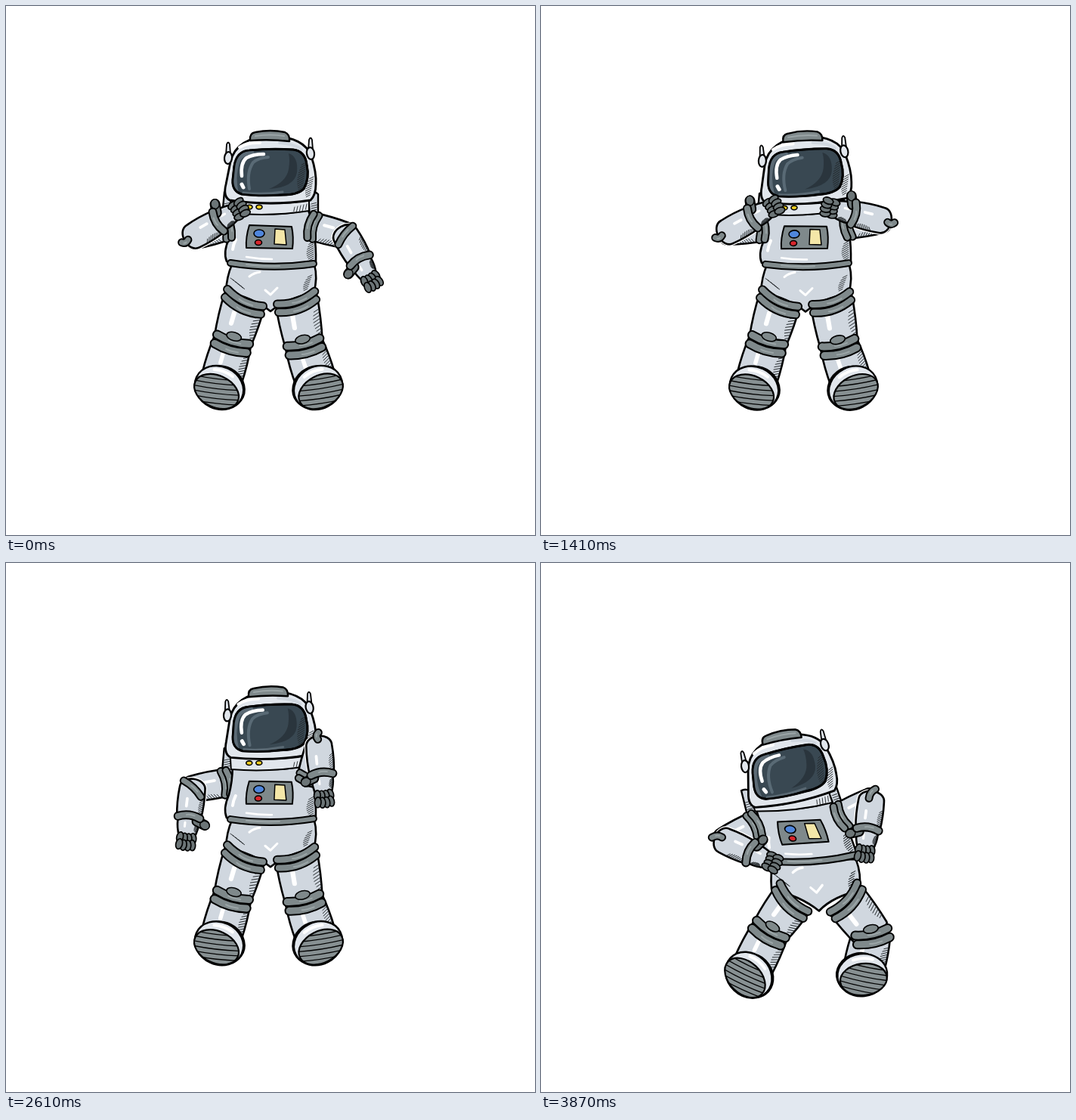
These frames come from a looping animation (700 by 700 pixels, 3.9 s). An HTML page with a canvas:

```html
<!DOCTYPE html>
<html lang="en">
<head>
<meta charset="utf-8">
<title>Dancing astronaut</title>
<style>
html, body { margin: 0; width: 100%; height: 100%; overflow: hidden; background: #fff; }
canvas { display: block; width: 700px; height: 700px; }
</style>
</head>
<body>
<canvas id="stage" width="700" height="700"></canvas>
<script>
const ctx = document.getElementById('stage').getContext('2d');
const LOOP = 3900, STEP = 30, BOB = 3060, FALL = 54, UPPER = 48, FORE = 72;
const SUIT = '#d0d7df', PALE = '#e1e6ec', GREY = '#7f898b', SHINE = '#9ba5a7', GLOVE = '#6c7577', INK = '#000';

// Key poses: head sway and tilt, and where the hands are. The rest of the body follows.
const poses = [
  { t: 0, sway: 0, tilt: 0, fall: 0, left: [310, 268], right: [485, 366] },
  { t: 570, sway: -12, tilt: -4, left: [327, 291], right: [368, 307] },
  { t: 810, left: [188, 286] },
  { t: 1050, sway: 12, tilt: 2, left: [293, 242], right: [385, 291] },
  { t: 1770, sway: -12, tilt: -9, left: [322, 299], right: [376, 249] },
  { t: 2190, sway: -1, tilt: -1, left: [350, 327], right: [384, 266] },
  { t: 2560, left: [236, 372] },
  { t: 3060, sway: 0, tilt: -5, fall: 0, left: [308, 366], right: [455, 356] },
  { t: 3240, fall: 18 },
  { t: 3870, sway: -21, tilt: -12, fall: FALL, left: [308, 341], right: [428, 330] }
];

// Monotone cubic interpolation through the poses that set the given part.
function sample(part, t, axis) {
  const keys = poses.filter(p => part in p);
  const value = k => axis === undefined ? keys[k][part] : keys[k][part][axis];
  const i = keys.findIndex(p => p.t > t) - 1;
  if (i < 0) return value(keys.length - 1);
  const slope = k => keys[k] && keys[k + 1] ? (value(k + 1) - value(k)) / (keys[k + 1].t - keys[k].t) : 0;
  const tangent = k => {
    const a = slope(k - 1), b = slope(k);
    return a * b > 0 ? 2 * a * b / (a + b) : 0;
  };
  const span = keys[i + 1].t - keys[i].t, u = (t - keys[i].t) / span, v = 1 - u;
  return v * v * (1 + 2 * u) * value(i) + u * u * (3 - 2 * u) * value(i + 1)
    + span * u * v * (v * tangent(i) - u * tangent(i + 1));
}

const clamp = (x, low, high) => Math.min(high, Math.max(low, x));
const mix = (a, b, k) => [a[0] + (b[0] - a[0]) * k, a[1] + (b[1] - a[1]) * k];
const angle = (a, b) => Math.atan2(b[1] - a[1], b[0] - a[0]);
const along = (p, dir, k) => [p[0] + Math.cos(dir) * k, p[1] + Math.sin(dir) * k];
const rad = deg => deg * Math.PI / 180;

function local(draw) { ctx.save(); draw(); ctx.restore(); }

function line(d, color = INK, width = 1) {
  ctx.strokeStyle = color;
  ctx.lineWidth = width;
  ctx.stroke(new Path2D(d));
}

function shape(d, fill, width = 2.4) {
  ctx.fillStyle = fill;
  ctx.fill(new Path2D(d));
  if (width) line(d, INK, width);
}

function oval(x, y, rx, ry, fill, turn = 0, width = 1.6) {
  ctx.beginPath();
  ctx.ellipse(x, y, rx, ry, turn, 0, 7);
  ctx.fillStyle = fill;
  ctx.fill();
  ctx.strokeStyle = INK;
  ctx.lineWidth = width;
  ctx.stroke();
}

function hatch(x, y, n, dx, dy, lx, ly) {
  let d = '';
  for (let i = 0; i < n; i++) {
    const k = .55 + .45 * Math.sin((i + 1) / n * 3);
    d += `M${x + dx * i},${y + dy * i}l${lx * k},${ly * k}`;
  }
  line(d, '#23282b', .9);
}

function strap(d, width) {
  line(d, INK, width + 4);
  line(d, GREY, width);
}

// Bent grey strap centred on p, lying across the given direction.
function band(p, dir, length, width = 8, bend = 4) {
  local(() => {
    ctx.translate(...p);
    ctx.rotate(dir + Math.PI / 2);
    const h = length / 2 - width / 2;
    strap(`M${-h},0Q0,${-bend * 2} ${h},0`, width);
    line(`M${-h * .5},${-bend}Q0,${-bend * 1.5} ${h * .25},${-bend}`, SHINE, 2);
  });
}

function limb(a, b, ra, rb, capA = 0, capB = 5, halo = false) {
  const L = Math.hypot(b[0] - a[0], b[1] - a[1]), dir = angle(a, b);
  const mid = (ra + rb) / 2 + 2, lit = Math.sin(dir) > .5 * Math.cos(dir) ? 1 : -1;
  const d = `M0,${-ra}Q${L / 2},${-mid} ${L},${-rb}C${L + capB * 1.33},${-rb} ${L + capB * 1.33},${rb} ${L},${rb}`
    + `Q${L / 2},${mid} 0,${ra}C${-capA * 1.33},${ra} ${-capA * 1.33},${-ra} 0,${-ra}Z`;
  local(() => {
    ctx.translate(...a);
    ctx.rotate(dir);
    if (halo) line(d, '#fff', 5);
    shape(d, SUIT, 2.6);
    const y = lit * ra * .3;
    line(`M${L * .36},${y}L${L * .62},${y}`, '#fff', ra * .22);
    hatch(L * .3, -lit * (mid - 2), 8, L * .07, 0, 4, lit * ra * .32);
  });
}

function leg(side, hip, knee, foot, turn) {
  const up = angle(hip, knee), lean = (up + angle(knee, foot)) / 2;
  limb(knee, mix(knee, foot, .8), 25, 27);
  limb(hip, knee, 28, 25);
  for (const k of [10, -2]) band(along(knee, lean, k), lean, 53, 9, 3);
  oval(...along(knee, lean, -6), 10, 5.5, GREY, lean - Math.PI / 2);
  for (const k of [9, -2]) band(along(hip, up, k), up - side * .16, 60, 8, 5);

  local(() => {
    ctx.translate(...foot);
    ctx.scale(-side, 1);
    ctx.rotate(rad(turn));
    oval(4, -3, 30, 26, SUIT, .2, 2.6);
    oval(0, 0, 33, 28, PALE, 0, 2.4);
    line('M-16,-19Q-4,-24 10,-21', '#fff', 4);
    local(() => {
      oval(-1, 6, 31, 21, '#879092', 0, 2.2);
      ctx.clip();
      ctx.rotate(rad(-18));
      for (let y = -13; y < 30; y += 6.5) line(`M-40,${y}Q0,${y + 4} 40,${y - 1}`, INK, 1.3);
    });
  });
}

function glove(wrist, tip, thumb) {
  const root = mix(wrist, thumb, .5);
  limb(wrist, mix(wrist, tip, .6), 14, 12);
  line(`M${root}L${thumb}`, INK, 14);
  line(`M${root}L${thumb}`, GLOVE, 10);
  oval(...thumb, 6.5, 5.5, GLOVE, angle(wrist, thumb), 1.4);
  local(() => {
    ctx.translate(...tip);
    ctx.rotate(angle(wrist, tip));
    for (const x of [-5, 4])
      for (let i = -1.5; i < 2; i++) oval(x - Math.abs(i), i * 5.8, 7, 4.3, GLOVE, i * .1, 1.7);
  });
}

// Two-bone reach; the elbow points outwards, and the side is +1 or -1.
function arm(side, shoulder, tip) {
  const reach = angle(shoulder, tip), ux = Math.cos(reach), uy = Math.sin(reach);
  const d = clamp(Math.hypot(tip[0] - shoulder[0], tip[1] - shoulder[1]), FORE - UPPER, FORE + UPPER);
  const a = (UPPER ** 2 - FORE ** 2 + d * d) / (2 * d);
  const h = Math.sqrt(Math.max(0, UPPER ** 2 - a * a)) * side * clamp((uy + .35) * 3, -1, 1);
  const elbow = [shoulder[0] + a * ux + h * uy, shoulder[1] + a * uy - h * ux];

  const up = angle(shoulder, elbow), fore = angle(elbow, tip);
  const wrist = mix(elbow, tip, .53);
  const thumb = along(along(wrist, fore, 8), fore + side * Math.PI / 2, 22);
  const open = clamp((Math.cos(up - fore) + .8) / .9, 0, 1);
  const fold = Math.atan2(Math.sin(up) + Math.sin(fore), Math.cos(up) + Math.cos(fore));

  limb(shoulder, elbow, 18, 17, 4, 13);
  for (const k of [7, 0]) band(along(shoulder, up, k), up, 39, 7, -3);
  limb(elbow, wrist, 17, 16, 13, 5, true);
  band(along(elbow, fore, -13 * (1 - open)), fold, 16 + 22 * open, 7, -2);
  glove(wrist, tip, thumb);
  band(wrist, fore, 37, 8, -3);
}

function drawBackpack() {
  shape('M289,246Q296,243 302,248L302,280L286,278Z', SUIT);
  shape('M400,247Q407,243 413,249L413,276L402,281Z', SUIT);
  hatch(288, 262, 5, 0, 3, 10, -2);
  hatch(404, 262, 5, 0, 3, 8, -2);
}

function drawPelvis() {
  shape('M299,342L408,342Q413,360 407,380Q372,386 350,404Q328,386 291,378Q292,358 299,342Z', SUIT, 2.6);
  line('M343,376L350,382L359,373', '#fff', 3);
  line('M322,358Q328,353 336,352', '#fff', 3);
  hatch(405, 356, 7, -1, 3, -8, 4);
  hatch(297, 360, 6, 3, 2.4, 6, 4);
}

function drawTorso() {
  shape('M300,270Q350,280 400,270Q411,300 410,339Q352,350 292,338Q287,326 295,308Q300,290 300,270Z', SUIT, 2.6);
  strap('M297,340Q352,349 407,341', 6);
  line('M318,342Q340,345 362,344', SHINE, 2);
  line('M300,322Q301,315 304,309', '#fff', 4);
  line('M318,332Q335,335 352,335', '#fff', 2.5);
  hatch(407, 312, 9, 0, 2.7, -9, 5);
  shape('M297,256Q350,266 401,257L401,271Q350,279 298,274Z', PALE, 2);
  hatch(398, 262, 5, -4, 1, -2, 9);
  for (const x of [322, 335]) oval(x, 266, 4, 2.8, '#f0cf22');
  shape('M322,290L378,292Q381,306 379,321L318,320Q317,306 322,290Z', GREY, 2);
  oval(335, 301, 7, 5, '#4f86dc');
  oval(334, 313, 4.5, 3.5, '#d8262c');
  shape('M356,295L369,296L371,316L355,315Z', '#f4e7a8', 1.5);
}

function drawHead() {
  shape('M296,257Q287,252 291,236Q294,221 297,206Q305,174 350,172Q395,173 404,199Q411,220 410,236Q410,250 403,257Q350,265 296,257Z', PALE, 2.8);
  line('M309,187Q320,180 336,181', '#fff', 4);
  line('M362,181Q383,183 391,190', SUIT, 4);
  hatch(407, 226, 9, -.6, 3, -8, 4);
  shape('M323,178Q322,168 330,167Q350,163 369,167Q376,170 375,179Q350,176 323,178Z', GREY, 2.4);
  line('M330,172Q350,169 368,172', SHINE, 2);

  const visor = 'M302,212Q305,192 322,191Q350,188 380,190Q396,192 398,210Q402,228 394,242Q386,250 366,250Q335,252 312,249Q299,245 300,230Z';
  shape(visor, '#394852', 3);
  local(() => {
    ctx.clip(new Path2D(visor));
    line('M305,246Q300,222 308,203Q314,194 326,194', '#5c6b76', 5);
    line('M322,242Q318,220 327,207Q334,201 347,200', '#596a75', 4);
    line('M314,247Q340,250 366,246', '#5a6973', 3);
    shape('M374,195Q387,199 385,220Q382,240 348,242Q371,233 374,216Q376,204 374,195Z', '#2a353d', 0);
    hatch(397, 207, 12, -.4, 3, -9, 5);
  });
  line(visor, INK, 2.6);
  line('M312,225Q310,208 318,201Q327,196 341,196', '#fff', 4.5);
  line('M312,236L314,240', '#fff', 5);

  for (const [x, y, turn] of [[294, 201, .1], [403, 195, -.15]]) {
    shape(`M${x - 3},${y - 4}l1,-14q2,-5 4,0l1,13Z`, PALE, 1.8);
    oval(x, y, 5, 8, PALE, turn, 2.2);
  }
}

function render(t) {
  ctx.fillStyle = '#fff';
  ctx.fillRect(0, 0, 700, 700);
  ctx.lineCap = ctx.lineJoin = 'round';

  const sway = sample('sway', t), tilt = rad(sample('tilt', t)), fall = sample('fall', t);
  const kick = fall / FALL, bob = 2.2 * Math.sin(t / BOB * 2 * Math.PI);

  // The waist follows part of the sway; the chest shears to meet the head.
  const dx = .25 * sway + 14 * kick, dy = -6 * kick;
  const shear = (dx - .8 * sway) / 75, slope = .4 * tilt;
  const crotch = 350 + .25 * sway + 23 * kick;
  const onTorso = draw => local(() => {
    ctx.transform(1, slope, shear, 1, dx - 342 * shear, dy - 350 * slope);
    draw();
  });
  const reach = (name, side, x) => {
    const shoulder = [x + dx + shear * -51, 291 + dy + slope * (x - 350)];
    arm(side, shoulder, [sample(name, t, 0), sample(name, t, 1)]);
  };
  const leftArm = () => reach('left', -1, 294);
  const tucked = t > 2600 && t < 3240;

  local(() => {
    ctx.translate(0, fall + bob);
    onTorso(drawBackpack);
    if (tucked) leftArm();
    local(() => {
      const lean = (crotch - 350 - dx) / 61, tall = (61 - dy) / 61;
      ctx.transform(1, 0, lean, tall, dx - 342 * lean, 342 + dy - 342 * tall);
      drawPelvis();
    });
    leg(-1, [crotch - 34, 388], [300 + .6 * sway + 16 * kick, 443 - 13 * kick],
      [282 + .2 * sway - 3 * kick, 505 - 16 * kick], 25 + .4 * sway + 27 * kick);
    leg(1, [crotch + 34, 388], [394 + .3 * sway + 50 * kick, 447 - 13 * kick],
      [413 - .2 * sway + 8 * kick, 505 - 16 * kick], 27 - .4 * sway - 29 * kick);
    onTorso(drawTorso);
    local(() => {
      ctx.translate(349 + sway, 221);
      ctx.rotate(tilt);
      ctx.translate(-349, -221);
      drawHead();
    });
    reach('right', 1, 403);
    if (!tucked) leftArm();
  });
}

const start = performance.now();
function tick() {
  const t = Math.max(0, performance.now() - start) % LOOP;
  render(Math.floor(t / STEP) * STEP);
  requestAnimationFrame(tick);
}
tick();
</script>
</body>
</html>
```
